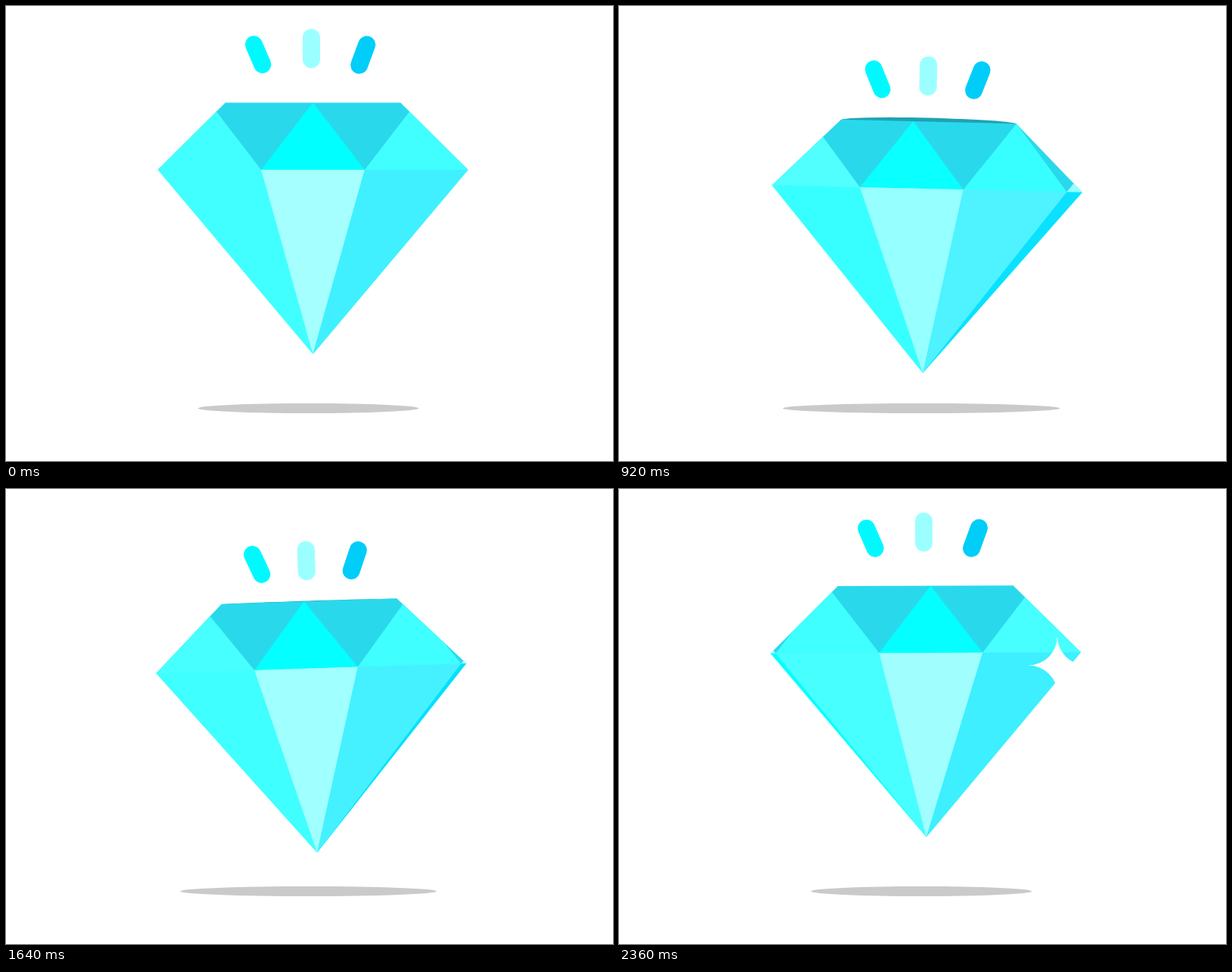
An HTML page with a canvas for the animation above (2400 ms loop, 800 px wide and 600 px high).

```html
<!DOCTYPE html>
<html lang="en">
<head>
<meta charset="utf-8">
<title>Diamond</title>
<style>
  html, body { margin: 0; width: 100%; height: 100%; overflow: hidden; background: #fff; }
  canvas { display: block; }
</style>
</head>
<body>
<canvas id="stage" width="800" height="600"></canvas>
<script>
const ctx = document.getElementById('stage').getContext('2d');
const LOOP = 2400, STEP = 40;
const CX = 404.5, TOP = 127.5, GIRDLE = 216, TIP = 459, PIVOT_Y = 285;
const HALF_TOP = 115.5, HALF = 204.5, FACET = HALF * 2 / 3;

// Facet colours at positions -2..2 facets from the middle
const LOWER = [[0, 255, 255], [66, 255, 255], [165, 255, 255], [64, 240, 255], [0, 222, 255]];
const CROWN = [[165, 255, 255], [66, 255, 255], [0, 255, 255], [66, 255, 255], [165, 255, 255]];

// Centre, tilt in degrees, inward travel, time of the second dip, colour
const PILLS = [
  { x: 332.3, y: 64, tilt: -23.4, dx: 6.8, dy: 16.7, dip: 1900, color: '#00f9ff' },
  { x: 402.5, y: 56, tilt: 0, dx: 0, dy: 20.5, dip: 1800, color: '#9cffff' },
  { x: 470.5, y: 64.5, tilt: 20.3, dx: -4.8, dy: 12.6, dip: 1800, color: '#00cdf8' }
];

const SPARKS = [
  { x: 227, y: 187.5, start: 220 },
  { x: 462, y: 217, start: 572 },
  { x: 578, y: 233, start: 2200 }
];
const SPARK_TIME = 200, SPARK_SIZE = 65;

const clamp = v => Math.min(1, Math.max(0, v));
const ease = v => (v = clamp(v), v < 0.5 ? 2 * v * v : 1 - 2 * (1 - v) ** 2);
const rise = (t, from, to) => ease((t - from) / (to - from));
const swell = (t, peak) => t < peak ? rise(t, 0, peak) : 1 - rise(t, peak, LOOP);

function shade(stops, k) {
  const i = Math.min(3, Math.floor(k + 2)), f = k + 2 - i;
  const mix = stops[i].map((v, n) => Math.round(v + (stops[i + 1][n] - v) * f));
  return `rgb(${mix})`;
}

function trace(...points) {
  ctx.beginPath();
  points.forEach(([x, y]) => ctx.lineTo(x, y));
  ctx.closePath();
}

function poly(color, ...points) {
  trace(...points);
  ctx.fillStyle = color;
  ctx.fill();
}

function oval(color, x, y, rx, ry) {
  ctx.beginPath();
  ctx.ellipse(x, y, rx, ry, 0, 0, Math.PI * 2);
  ctx.fillStyle = color;
  ctx.fill();
}

function drawGem(t) {
  const lid = 5.5 * rise(t, 360, 900) * (1 - rise(t, 1200, 1840));
  if (lid > 0) oval('#1fa2b4', CX, TOP + 0.5, HALF_TOP, lid);

  const left = [CX - HALF, GIRDLE], right = [CX + HALF, GIRDLE], tip = [CX, TIP];
  const outline = [[CX - HALF_TOP, TOP], [CX + HALF_TOP, TOP], right, tip, left];
  poly('#29d9eb', outline[0], outline[1], right, left);
  poly('#42ffff', left, right, tip);

  ctx.save();
  trace(...outline);
  ctx.clip();
  const shift = 3 * t / LOOP % 1;
  for (let i = -1; i <= 2; i++) {
    const k = i - shift, x = CX + k * FACET;
    const a = [x - FACET / 2, GIRDLE], b = [x + FACET / 2, GIRDLE];
    poly(shade(CROWN, k), a, [x, TOP], b);
    poly(shade(LOWER, k), a, b, tip);
  }
  ctx.restore();
}

function drawSpark({ x, y, start }, t) {
  const p = (t - start) / SPARK_TIME;
  if (p <= 0 || p >= 1) return;
  const r = SPARK_SIZE * Math.sin(Math.PI * p), q = Math.PI / 2;
  ctx.beginPath();
  ctx.arc(x + r, y + r, r, -q, -2 * q, true);
  ctx.arc(x - r, y + r, r, 0, -q, true);
  ctx.arc(x - r, y - r, r, q, 0, true);
  ctx.arc(x + r, y - r, r, 2 * q, q, true);
  ctx.fillStyle = '#fff';
  ctx.fill();
}

function drawPill(p, t) {
  let phase = t / 1200;
  if (t > 1200) {
    phase = t < p.dip ? 0.5 * (t - 1200) / (p.dip - 1200)
                      : 0.5 + 0.5 * (t - p.dip) / (LOOP - p.dip);
  }
  const push = Math.abs(Math.sin(Math.PI * phase)) ** 1.5;
  ctx.save();
  ctx.translate(p.x + p.dx * push, p.y + p.dy * push);
  ctx.rotate(p.tilt * Math.PI / 180);
  ctx.beginPath();
  ctx.moveTo(0, -14.3);
  ctx.lineTo(0, 14.3);
  ctx.lineWidth = 23;
  ctx.lineCap = 'round';
  ctx.strokeStyle = p.color;
  ctx.stroke();
  ctx.restore();
}

function draw(t) {
  ctx.fillStyle = '#fff';
  ctx.fillRect(0, 0, 800, 600);
  oval('#cacaca', 398.5, 530.5, 145.5 + 38.2 * swell(t, 1045), 6.5);

  ctx.save();
  ctx.translate(CX, PIVOT_Y + 28 * swell(t, 1200));
  ctx.rotate(2 * Math.PI / 180 * Math.sin(2 * Math.PI * t / LOOP));
  ctx.translate(-CX, -PIVOT_Y);
  drawGem(t);
  SPARKS.forEach(s => drawSpark(s, t));
  PILLS.forEach(p => drawPill(p, t));
  ctx.restore();
}

function tick() {
  const t = performance.now() % LOOP;
  draw(Math.floor(t / STEP) * STEP);
  requestAnimationFrame(tick);
}
tick();
</script>
</body>
</html>
```
